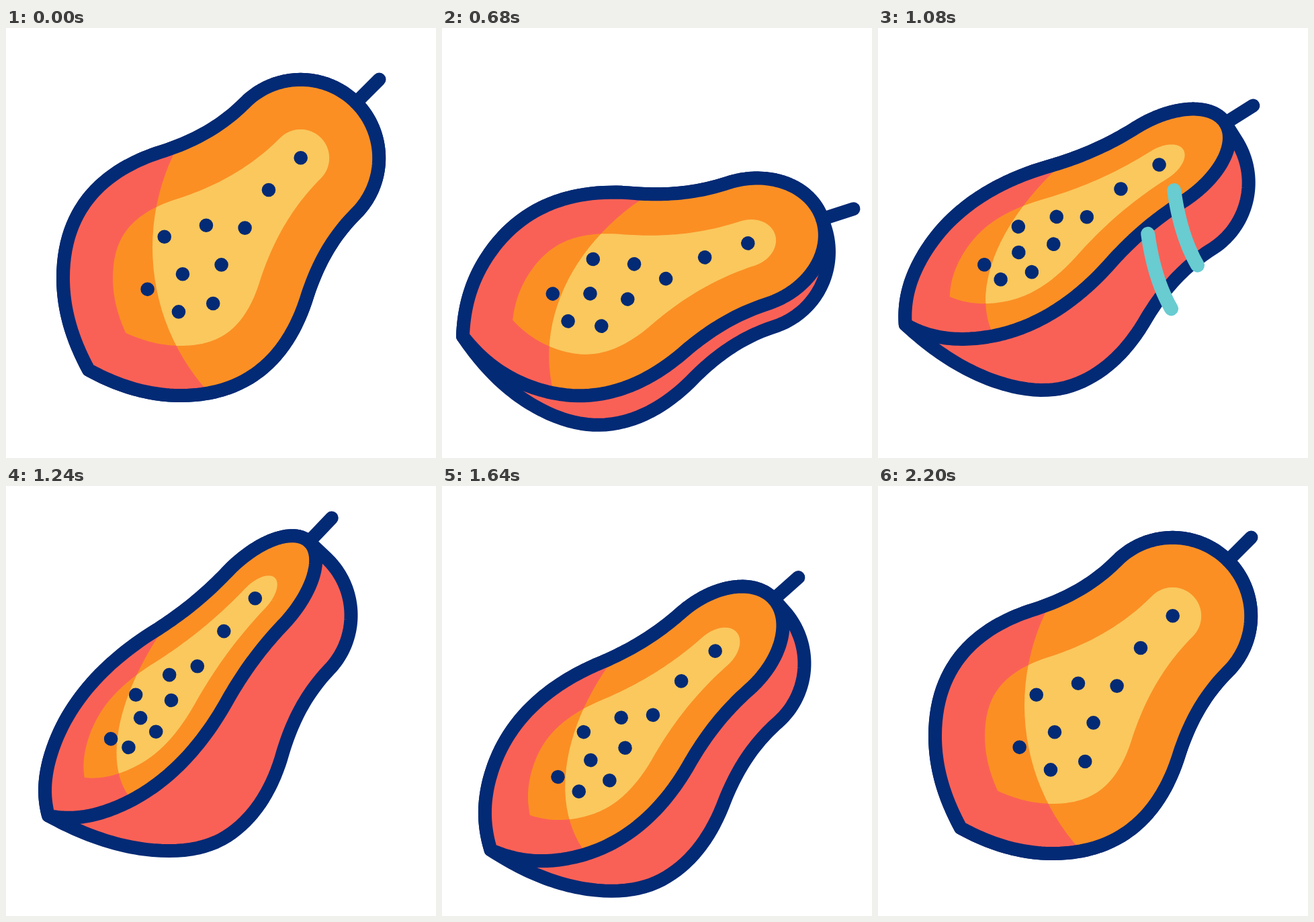
An HTML page with a canvas that plays this animation: 640 px wide and 640 px high, repeating every 2.4 s.

```html
<!DOCTYPE html>
<html lang="en">
<head>
<meta charset="utf-8">
<title>Rocking papaya</title>
<style>
  html, body { margin: 0; width: 100%; height: 100%; overflow: hidden; background: #fff; }
  canvas { display: block; width: 640px; height: 640px; }
</style>
</head>
<body>
<canvas id="stage" width="640" height="640"></canvas>
<script>
const ctx = document.getElementById('stage').getContext('2d');
const LOOP = 2400, TAU = Math.PI * 2;
const NAVY = '#032a75', ORANGE = '#fb8f24', YELLOW = '#fac85d', RED = '#fa6156', TEAL = '#68ccd1';

const clamp = v => Math.min(1, Math.max(0, v));
const ease = (t, from, to) => {
  const k = clamp((t - from) / (to - from));
  return k * k * (3 - 2 * k);
};

// Eased swing through [time, value] poses
const swing = (t, ...poses) => poses.reduce((v, [time, value], i) =>
  i ? v + (value - poses[i - 1][1]) * ease(t, poses[i - 1][0], time) : value, 0);

// The fruit rocks about a pivot on its long axis while the pivot hops
const PIVOT = 105, REST = 316, DIAG = Math.SQRT1_2;

function pose(t) {
  const angle = swing(t, [200, 45], [800, 15], [1400, 53], [1800, 35.4], [2200, 45]) * Math.PI / 180;
  const slide = swing(t, [870, 0], [1400, -85], [1830, 0]);
  const hop = swing(t, [200, 0], [690, 100], [1230, -25], [1870, 80], [2200, 0]);
  return {
    angle,
    x: REST + slide + PIVOT * (DIAG - Math.cos(angle)),
    y: REST + hop - PIVOT * (DIAG - Math.sin(angle)),
    turn: swing(t, [200, 0], [1400, 0.535], [2000, 0])
  };
}

// Upright drawing point to [along the axis, distance from it]
const local = (x, y) => [(x - y) * DIAG, (2 * REST - x - y) * DIAG];

const HEAD = 173.2, HEAD_R = 116.7, TOP = HEAD + HEAD_R;
const nodes = [
  local(123, 509), local(102, 470), local(85, 425),
  local(85, 372), local(85, 268), local(146, 210),
  local(235, 183), local(280, 168), local(320, 147), [HEAD, HEAD_R]
];

// Half outline from the tip, over the belly and waist, round the head
function buildProfile() {
  const pts = [nodes[0]], steps = 28;
  for (let n = 0; n < nodes.length - 1; n += 3) {
    const [p, q, r, s] = nodes.slice(n, n + 4);
    for (let i = 1; i <= steps; i++) {
      const k = i / steps, m = 1 - k;
      pts.push([0, 1].map(c =>
        m * m * m * p[c] + 3 * m * m * k * q[c] + 3 * m * k * k * r[c] + k * k * k * s[c]));
    }
  }
  for (let i = 1; i <= 40; i++) {
    const f = i / 40 * Math.PI / 2;
    pts.push([HEAD + HEAD_R * Math.sin(f), HEAD_R * Math.cos(f)]);
  }
  return pts;
}
const profile = buildProfile();

function outline(upper, lower = upper) {
  const path = new Path2D();
  for (const [a, w] of profile) path.lineTo(a, -upper(a, w));
  for (const [a, w] of [...profile].reverse()) path.lineTo(a, lower(a, w));
  path.closePath();
  return path;
}

const flat = outline((a, w) => w);

const shade = new Path2D();
shade.rect(-500, -500, 1000, 1000);
shade.arc(150.3, 165.1, 321, 0, TAU);

const seeds = [[173.5, 0], [106, 0], [41, 15], [3, -28.5], [-53, -60.5],
               [-73, -2], [-22.5, 29], [-126, -23], [-117, 33.5], [-72, 61]];

function pen(color, width) {
  ctx.strokeStyle = color;
  ctx.lineWidth = width;
}

function flesh(rim, core) {
  ctx.fillStyle = core;
  ctx.fill(flat);
  pen(rim, 148);
  ctx.stroke(flat);
}

function drawBody(s, bulge) {
  const taper = a => a < -110 ? 1 - ((a + 110) / 163) ** 2 : 1;
  const path = outline((a, w) => w * s, (a, w) => w + bulge * taper(a));
  ctx.fillStyle = RED;
  ctx.fill(path);
  pen(NAVY, 20);
  ctx.stroke(path);
}

function drawFace(s) {
  ctx.save();
  ctx.scale(1, s);
  ctx.clip(flat);
  flesh(ORANGE, YELLOW);
  ctx.clip(shade, 'evenodd');
  flesh(RED, ORANGE);
  ctx.restore();

  pen(NAVY, 20);
  ctx.stroke(outline((a, w) => w * s));
  ctx.beginPath();
  ctx.moveTo(TOP, 0);
  ctx.lineTo(338.7, 0);
  ctx.stroke();

  ctx.fillStyle = NAVY;
  for (const [a, b] of seeds) {
    ctx.beginPath();
    ctx.arc(a, b * s, 10.3, 0, TAU);
    ctx.fill();
  }
}

function drawStreaks(t) {
  const from = clamp((t - 1100) / 120), to = clamp((t - 950) / 110);
  if (to <= from) return;
  pen(TEAL, 21);
  for (const [a, b] of [[172, 44], [104.5, 78]]) {
    ctx.beginPath();
    for (let i = 0; i <= 20; i++) {
      const k = from + (to - from) * i / 20, bend = 2 * k * (1 - k);
      ctx.lineTo(a - 28 * bend - 30 * k * k, b + 62 * bend + 113 * k * k);
    }
    ctx.stroke();
  }
}

function draw(t) {
  const { x, y, angle, turn } = pose(t), s = 1 - turn;
  ctx.setTransform(1, 0, 0, 1, 0, 0);
  ctx.fillStyle = '#fff';
  ctx.fillRect(0, 0, 640, 640);
  ctx.translate(x, y);
  ctx.rotate(-angle);
  ctx.lineJoin = ctx.lineCap = 'round';
  drawBody(s, 71 * turn);
  drawFace(s);
  drawStreaks(t);
}

const start = performance.now();
function tick() {
  draw((performance.now() - start) % LOOP);
  requestAnimationFrame(tick);
}
tick();
</script>
</body>
</html>
```
